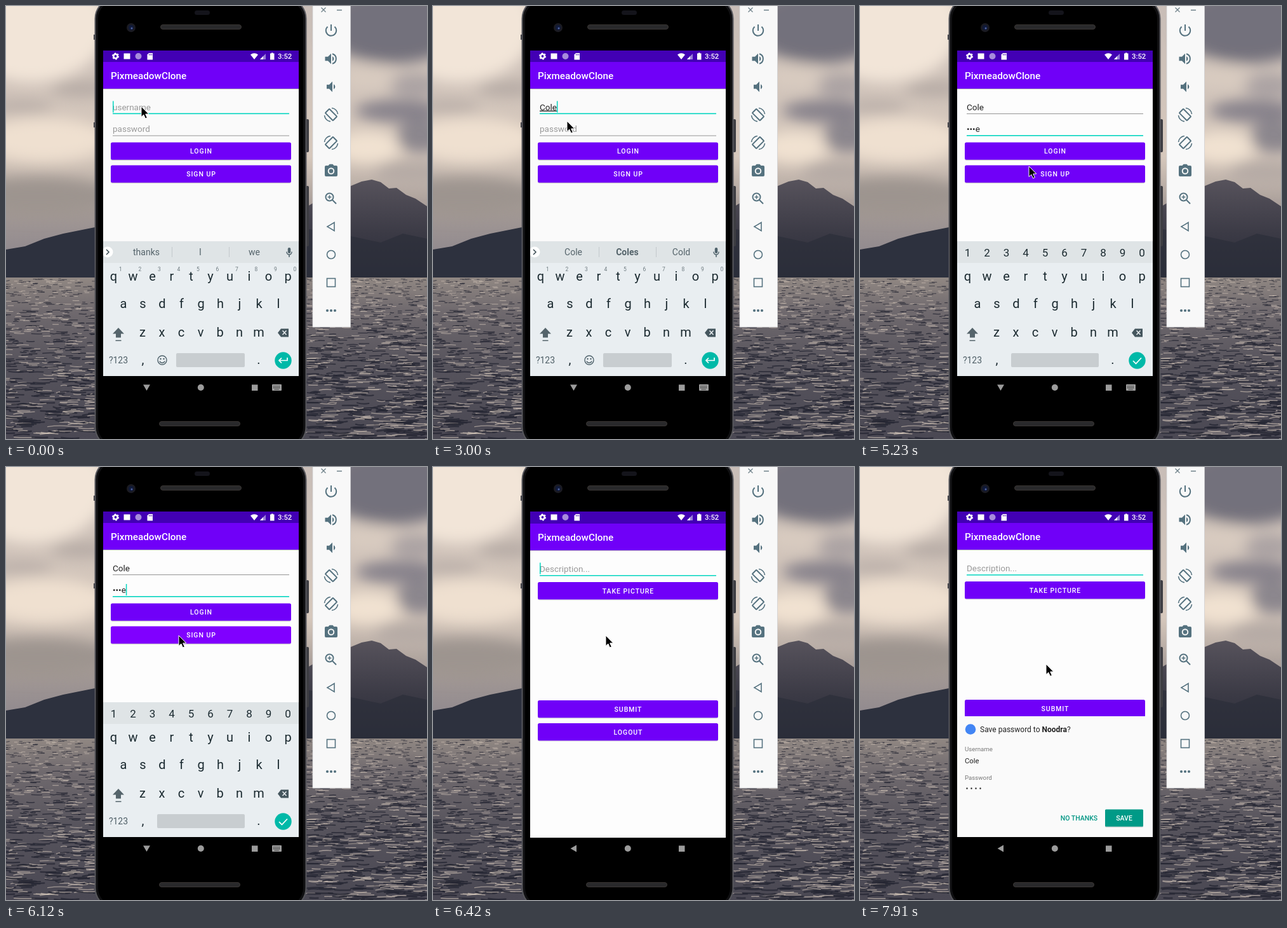
Animation of 663 by 681 pixels, one loop 8000 ms. Source, as an HTML page:

```html
<!DOCTYPE html>
<html lang="en">
<head>
<meta charset="utf-8">
<title>Phone sign-up</title>
<style>
  html, body { margin: 0; width: 100%; height: 100%; overflow: hidden; background: #000; }
  svg { display: block; width: 663px; height: 681px; }
  text { font-family: Roboto, sans-serif; white-space: pre; }
  .mid { text-anchor: middle; }
  .med { font-weight: 500; }
  .btn text { font-size: 10.5px; font-weight: 500; letter-spacing: .94px; fill: #fff; text-anchor: middle; }
  .input { font-size: 13.5px; fill: #212121; }
  .hint { font-size: 13.5px; fill: #9a9a9a; }
  .key { font-size: 20px; fill: #1b2a30; text-anchor: middle; }
  .sup { font-size: 8.5px; fill: #6f7b80; text-anchor: middle; }
  .word { font-size: 14px; fill: #55646b; text-anchor: middle; }
  .line { fill: none; stroke: #55727f; stroke-width: 2; }
  .thin { stroke-width: 1.6; }
  .ico { fill: #55727f; }
</style>
</head>
<body>
<svg viewBox="0 0 663 681">
  <defs>
    <linearGradient id="sky" x2="0" y2="1">
      <stop offset="0" stop-color="#c9beb8"/><stop offset=".55" stop-color="#d6c8bc"/>
      <stop offset=".75" stop-color="#a39995"/><stop offset="1" stop-color="#85808a"/>
    </linearGradient>
    <linearGradient id="sea" x2="0" y2="1">
      <stop offset="0" stop-color="#918883"/><stop offset=".2" stop-color="#706a6e"/>
      <stop offset=".55" stop-color="#56535c"/><stop offset="1" stop-color="#4a4853"/>
    </linearGradient>
    <linearGradient id="hill" x2="0" y2="1">
      <stop offset="0" stop-color="#57535c"/><stop offset=".55" stop-color="#3b3a45"/><stop offset="1" stop-color="#292c39"/>
    </linearGradient>
    <filter id="soft" x="-50%" y="-50%" width="200%" height="200%"><feGaussianBlur stdDeviation="11"/></filter>
    <filter id="shade" x="-10%" y="-30%" width="120%" height="170%"><feDropShadow dx="0" dy="1" stdDeviation=".6" flood-opacity=".25"/></filter>
    <clipPath id="screen"><rect x="153" y="70" width="308" height="548"/></clipPath>
  </defs>

  <!-- landscape -->
  <rect width="663" height="430" fill="url(#sky)"/>
  <g id="clouds" filter="url(#soft)"></g>
  <path d="M0 383 30 378 60 366 90 358 115 353 140 348V428H0Z" fill="#2d313e"/>
  <path d="M470 318 500 300 543 283 560 276 576 273 590 277 603 287 615 286 630 297 645 303 663 315V428H470Z" fill="url(#hill)"/>
  <path d="M470 350 543 362 590 372 625 358 663 366V428H470Z" fill="#2b2e3a" opacity=".7"/>
  <rect y="427" width="663" height="254" fill="url(#sea)"/>
  <g id="waves" fill="none" stroke-linecap="round"></g>

  <!-- phone -->
  <g fill="#3d3d42">
    <rect x="138" y="45" width="4" height="8"/><rect x="138" y="183" width="4" height="8"/>
    <rect x="472" y="178" width="5" height="52" rx="2"/><rect x="472" y="283" width="5" height="95" rx="2"/>
  </g>
  <rect x="140.500" y="-12" width="332" height="706" rx="32" fill="#101012" stroke="#57575c" stroke-width="2"/>
  <rect x="145" y="-8" width="323" height="698" rx="28"/>
  <rect x="297" y="7" width="24" height="7" rx="3.500" fill="#14141b"/>
  <circle cx="197" cy="34" r="7" fill="#1b1b22"/><circle cx="197" cy="34" r="4" fill="#101a3a"/><circle cx="198" cy="35" r="1.500" fill="#5163a0"/>
  <g fill="#29292b" stroke="#3a3634">
    <rect x="243.500" y="29.500" width="127" height="7" rx="3.500"/><rect x="241.500" y="653.500" width="127" height="7" rx="3.500"/>
  </g>

  <g clip-path="url(#screen)">
    <g id="app">
      <rect id="page" x="153" y="70" width="308" height="512"/>
      <rect x="153" y="50" width="308" height="38.300" fill="#4200b4"/>
      <rect x="153" y="88" width="308" height="42" fill="#7000f8" filter="url(#shade)"/>
      <text class="med" x="165" y="115" font-size="15.300" fill="#fff">PixmeadowClone</text>
      <g id="login">
        <text class="hint" id="userHint" x="168" y="163.500">username</text>
        <text class="input" id="user" x="168" y="163.500"></text>
        <rect id="userLine" x="168" width="278"/>
        <text class="hint" id="passHint" x="168" y="198">password</text>
        <text class="input" id="pass" x="168" y="198"></text>
        <rect id="passLine" x="168" width="278"/>
      </g>
      <g id="post">
        <text class="hint" x="168" y="163.500">Description...</text>
        <rect x="168" y="169" width="278" height="1.500" fill="#03d5c0"/>
      </g>
      <rect id="caret" width="1.500" height="18" fill="#03d5c0"/>
    </g>
    <g id="keys">
      <rect x="153" y="370" width="308" height="212" fill="#e9eef1"/>
      <rect x="153" y="370" width="308" height="34" fill="#dfe4e6"/>
      <g id="plain">
        <circle cx="160" cy="387" r="8.500" fill="#fff"/>
        <path d="m158 383 4 4-4 4" fill="none" stroke="#37474f" stroke-width="1.500"/>
        <path d="M261.500 379v16M351.500 379v16" stroke="#c3c9cc"/>
        <g fill="none" stroke="#4f626b" stroke-width="1.500"><path d="M442 386.500a4 4.500 0 0 0 8 0M446 391v4"/></g>
        <rect x="443.800" y="380" width="4.400" height="9" rx="2.200" fill="#4f626b"/>
        <g fill="none" stroke="#4f626b" stroke-width="1.400"><circle cx="246" cy="557" r="7"/><path d="M242 558.500a4.300 4.300 0 0 0 8 0"/></g>
        <circle cx="243.500" cy="555" r="1.200" fill="#4f626b"/><circle cx="248.500" cy="555" r="1.200" fill="#4f626b"/>
      </g>
      <g id="numbers"></g>
      <rect id="space" y="546" height="22" rx="2" fill="#c8cdd0"/>
      <path d="m177 506 9 9.500h-5v6h-8v-6h-5ZM172.500 525.500h9v1.500h-9Z" fill="#55646b"/>
      <path d="m428 514 5-6.500h12v13h-12Z" fill="#45565e"/>
      <path d="m435.500 510.500 6 6.500m0-6.500-6 6.500" stroke="#e9eef1" stroke-width="1.500"/>
      <text class="mid" x="177" y="562" font-size="14" fill="#4f5f67">?123</text>
      <circle cx="436.500" cy="557.500" r="13.200" fill="#00b9a8"/>
      <path id="action" fill="none" stroke="#fff" stroke-width="1.700"/>
    </g>

    <g id="status" fill="#fff">
      <circle cx="172.500" cy="79" r="3.200" fill="none" stroke="#fff" stroke-width="2.600"/>
      <circle cx="172.500" cy="79" r="4.800" fill="none" stroke="#fff" stroke-width="1.500" stroke-dasharray="2.500 2.530"/>
      <rect x="185.500" y="74.500" width="10" height="9"/>
      <circle cx="208.500" cy="79" r="5" fill="#a78bdc"/><path d="M205 76a5 5 0 0 0 7 6.500 5 5 0 0 1-7-6.500" fill="#d5c8f0"/>
      <path d="M225 74h6v10.500h-8.500v-8Z"/><path d="M225.500 75.500v2m2-2v2m2-2v2" stroke="#4200b4"/>
      <path d="M385 76.500q6-4.500 12 0l-6 7.500Z"/><path d="M400 84h9v-9Z" fill="#9a80d8"/><path d="M400 84h5v-5Z"/>
      <path d="M418 73.500h2.500v1h2V84.500h-6.500v-10h2Z"/>
      <text class="med" x="428" y="83" font-size="11.300">3:52</text>
    </g>

    <g fill="#9c9c9c">
      <path id="back"/><circle cx="306.800" cy="600" r="5"/><rect x="387" y="595.500" width="9.500" height="9.500"/>
      <g id="kbd"><rect x="419" y="595" width="15" height="10" rx="1"/><path d="M421 598h11M421 600.500h11M423 603h7" stroke="#000" stroke-dasharray="1.200 1"/></g>
    </g>

    <g id="popup">
      <rect x="153" y="392" width="308" height="190" fill="#fafafa"/>
      <circle cx="174" cy="412.500" r="8.300" fill="#4285f4"/>
      <text x="189" y="416.500" font-size="12" fill="#212121">Save password to <tspan font-weight="700">Noodra</tspan>?</text>
      <g font-size="9.700" fill="#777"><text x="165" y="447">Username</text><text x="165" y="492">Password</text></g>
      <text x="165" y="465.500" font-size="11.300" fill="#212121">Cole</text>
      <path d="M168.500 505.500h22" stroke="#212121" stroke-width="2.400" stroke-linecap="round" stroke-dasharray="0 7"/>
      <text class="med mid" x="345" y="556" font-size="10.500" fill="#009684">NO THANKS</text>
      <rect x="386" y="538.500" width="60" height="27" rx="1.500" fill="#009a87" filter="url(#shade)"/>
      <text class="med mid" x="416" y="556" font-size="10.500" fill="#fff">SAVE</text>
    </g>
  </g>

  <!-- emulator toolbar -->
  <rect x="483" width="59.500" height="505" fill="#f8f8f8"/>
  <path d="M483 0v505h59.500V0" fill="none" stroke="#d0d0d2" stroke-width=".8"/>
  <path d="m496.500 2.500 7 7m0-7-7 7M521 6.500h8" stroke="#6d7f88" stroke-width="1.300"/>
  <path class="line" d="M512 29v10M506.500 32.500a8.200 8.200 0 1 0 11 0"/>
  <g transform="translate(512 83)"><path class="ico" d="M-9.500-3.300h4.500l5-5V8.300l-5-5h-4.500ZM2-4a4.500 4.500 0 0 1 0 8Z"/><path class="line" d="M2-7.700a8 8 0 0 1 0 15.400"/></g>
  <path class="ico" d="M505 123.700h4l5-5v16.600l-5-5h-4ZM516 123a4.500 4.500 0 0 1 0 8Z"/>
  <g id="turn" transform="translate(512 171)">
    <rect class="line" x="-4.500" y="-8.500" width="9" height="17" rx="1" transform="rotate(-45)"/>
    <path class="line thin" d="M1-10.500A10.500 10.500 0 0 1 10.500-1M-1 10.500A10.500 10.500 0 0 1-10.500 1"/>
  </g>
  <use href="#turn" transform="translate(1024 44) scale(-1 1)"/>
  <path class="ico" d="M504 251h3.500l2-2.300h5l2 2.300h3.500a2 2 0 0 1 2 2v13a2 2 0 0 1-2 2h-16a2 2 0 0 1-2-2v-13a2 2 0 0 1 2-2Z"/>
  <circle cx="512" cy="259.500" r="4.300" fill="none" stroke="#f8f8f8" stroke-width="1.900"/>
  <path class="line" d="m514 305 6 6"/><path class="line thin" d="M506.500 300.500h6m-3-3v6"/><circle class="line" cx="509.500" cy="300.500" r="6"/>
  <path class="line thin" d="m506 347 11-6.500v13Z"/>
  <circle class="line thin" cx="512" cy="391" r="6.500"/>
  <rect class="line thin" x="505.500" y="428.500" width="13" height="13"/>
  <g class="ico"><circle cx="506" cy="479" r="2.100"/><circle cx="512" cy="479" r="2.100"/><circle cx="518" cy="479" r="2.100"/></g>

  <path id="mouse" d="M0 0V16.500L3.800 13 6.500 19 9.300 17.700 6.700 12H11.800Z" stroke="#fff" stroke-width="1"/>
</svg>

<script>
const LOOP = 8000;
const $ = id => document.getElementById(id);

function add(parent, tag, attrs, text) {
  const el = document.createElementNS('http://www.w3.org/2000/svg', tag);
  for (const k in attrs) el.setAttribute(k, attrs[k]);
  if (text) el.textContent = text;
  parent.append(el);
  return el;
}

function button(parent, y, label) {
  const g = add(parent, 'g', { class: 'btn' });
  const face = add(g, 'rect', { x: 165, y, width: 284, height: 27.3, rx: 2.5, fill: '#7000f8', filter: 'url(#shade)' });
  add(g, 'text', { x: 307.5, y: y + 17.5 }, label);
  return face;
}

function keyRow(text, x, y, parent = $('keys'), cls = 'key', size) {
  [...text].forEach((ch, i) => {
    const el = add(parent, 'text', { class: cls, x: x + i * 30.5, y }, ch);
    if (size) el.style.fontSize = size + 'px';
  });
}

// cx, cy, rx, ry, colour
[[40, 30, 120, 90, '#f2e5d8'], [120, 130, 50, 12, '#b5aaa4'], [25, 158, 50, 10, '#b9aea8'],
 [60, 210, 100, 34, '#efe0d0'], [50, 300, 120, 30, '#9d948f'],
 [610, 30, 110, 60, '#73717c'], [570, 112, 45, 20, '#d8cbc0'], [645, 125, 40, 18, '#aaa2a3'],
 [620, 165, 70, 18, '#87828b'], [570, 222, 50, 24, '#f1e2d1'], [655, 205, 40, 26, '#8b868d'],
 [640, 262, 60, 18, '#b5aaa5']
].forEach(([cx, cy, rx, ry, fill]) => add($('clouds'), 'ellipse', { cx, cy, rx, ry, fill }));

// ripples grow longer and thicker towards the viewer
let seed = 7;
const rand = () => (seed = seed * 16807 % 2147483647) / 2147483647;
for (let i = 0; i < 1500; i++) {
  const depth = rand() ** 1.3, dark = i % 5 < 3;
  const x = rand() < .43 ? rand() * 150 - 12 : 465 + rand() * 198;
  const len = (5 + depth * 20) * (.5 + rand()), bend = depth * (rand() * 8 - 4);
  add($('waves'), 'path', {
    d: `M${x} ${429 + depth * 252}q${len / 2} ${bend} ${len} ${bend / 3}`,
    stroke: dark ? '#262733' : '#d6c8bb',
    'stroke-width': .8 + depth * (dark ? 1.6 : .7),
    opacity: dark ? .8 : .75 - depth * .15
  });
}

button($('login'), 214.5, 'LOGIN');
const signUp = button($('login'), 250.5, 'SIGN UP');
button($('post'), 180, 'TAKE PICTURE');
button($('post'), 366, 'SUBMIT');
button($('post'), 402, 'LOGOUT');

keyRow('qwertyuiop', 169.5, 432);
keyRow('asdfghjkl', 185, 475);
keyRow('zxcvbnm', 215, 520);
keyRow(',', 215.5, 563);
keyRow('.', 398, 563);
keyRow('1234567890', 180.5, 417, $('plain'), 'sup');
keyRow('1234567890', 169.5, 393.5, $('numbers'), 'key', 17);
const words = [221, 306, 391].map(x => add($('plain'), 'text', { class: 'word', x, y: 392 }));

// Each step changes only the listed parts of the state.
const steps = [
  [0, { view: 'user', user: '', pass: '', caret: 1, words: 'thanks I we', mouse: [213, 158], press: 0, dy: 0, popup: 230 }],
  [300, { caret: 0 }],
  [750, { caret: 1 }],
  [1200, { caret: 0 }],
  [1650, { caret: 1, user: 'C', words: 'C Come Can' }],
  [2100, { user: 'Co', words: 'Co Colin Corey' }],
  [2400, { user: 'Col', words: 'Col Cole Colin' }],
  [2550, { user: 'Cole', words: 'Cole Coles Cold' }],
  [2850, { mouse: [213, 165] }],
  [3000, { mouse: [211, 181] }],
  [3150, { mouse: [210, 190] }],
  [3290, { view: 'pass' }],
  [3740, { caret: 0 }],
  [3890, { caret: 1, pass: 'C' }],
  [4340, { pass: '•o' }],
  [4640, { pass: '••l' }],
  [4790, { pass: '•••e' }],
  [5090, { mouse: [232, 216] }],
  [5230, { mouse: [266, 252], caret: 0 }],
  [5380, { mouse: [271, 262] }],
  [5530, { mouse: [272, 265] }],
  [5680, { caret: 1 }],
  [5970, { press: 1 }],
  [6120, { press: 2 }],
  [6270, { view: 'post', dy: 12 }],
  [6420, { dy: 1 }],
  [6570, { dy: 0 }],
  [6720, { caret: 0 }],
  [7170, { caret: 1, popup: 150 }],
  [7320, { popup: 36 }],
  [7460, { popup: 0 }],
  [7760, { caret: 0, mouse: [285, 294] }],
  [7910, { mouse: [293, 310] }]
];
let last = {};
const states = steps.map(([at, change]) => [at, last = { ...last, ...change }]);

const show = (id, on) => { $(id).style.display = on ? '' : 'none'; };
const set = (id, attrs) => { for (const k in attrs) $(id).setAttribute(k, attrs[k]); };
const shift = (id, x, y) => set(id, { transform: `translate(${x} ${y})` });

function fieldLine(id, y, active) {
  set(id, { y: active ? y - .5 : y, height: active ? 1.6 : 1, fill: active ? '#03d5c0' : '#959595' });
}

function draw(s) {
  const post = s.view === 'post', pass = s.view === 'pass';
  show('login', !post);
  show('post', post);
  show('keys', !post);
  show('kbd', !post);
  show('plain', !pass);
  show('numbers', pass);
  show('userHint', !s.user);
  show('passHint', !s.pass);
  set('page', { fill: pass || post ? '#fdfdfd' : '#fafafa' });
  $('user').textContent = s.user;
  $('user').style.textDecoration = pass ? 'none' : 'underline';
  $('pass').textContent = s.pass;
  fieldLine('userLine', 169, !pass);
  fieldLine('passLine', 203.5, pass);

  const typed = post ? '' : pass ? s.pass : s.user;
  const width = typed ? $(s.view).getComputedTextLength() : 0;
  set('caret', { x: 168 + width, y: pass ? 184 : 149.5 });
  show('caret', s.caret);

  s.words.split(' ').forEach((w, i) => {
    words[i].textContent = w;
    words[i].style.fontWeight = i === 1 && s.user ? 700 : 400;
  });
  set('space', { x: pass ? 238 : 268, width: pass ? 138 : 108 });
  set('action', { d: pass ? 'm430 558 4.500 4.500 8.500-9' : 'M443 553v4.500h-13m4-4-4 4 4 4' });
  set('back', { d: post ? 'M216.500 600l9.500-5.500v11Z' : 'M216 595.500h11l-5.500 9.500Z' });
  signUp.setAttribute('fill', ['#7000f8', '#7800fb', '#8000ff'][s.press]);
  shift('app', 0, s.dy);
  shift('popup', 0, s.popup);
  shift('mouse', ...s.mouse);
}

let shown;
function frame(now) {
  const t = now % LOOP;
  const state = states.findLast(([at]) => at <= t)[1];
  if (state !== shown) draw(shown = state);
  requestAnimationFrame(frame);
}
draw(shown = states[0][1]);
requestAnimationFrame(frame);
</script>
</body>
</html>
```
